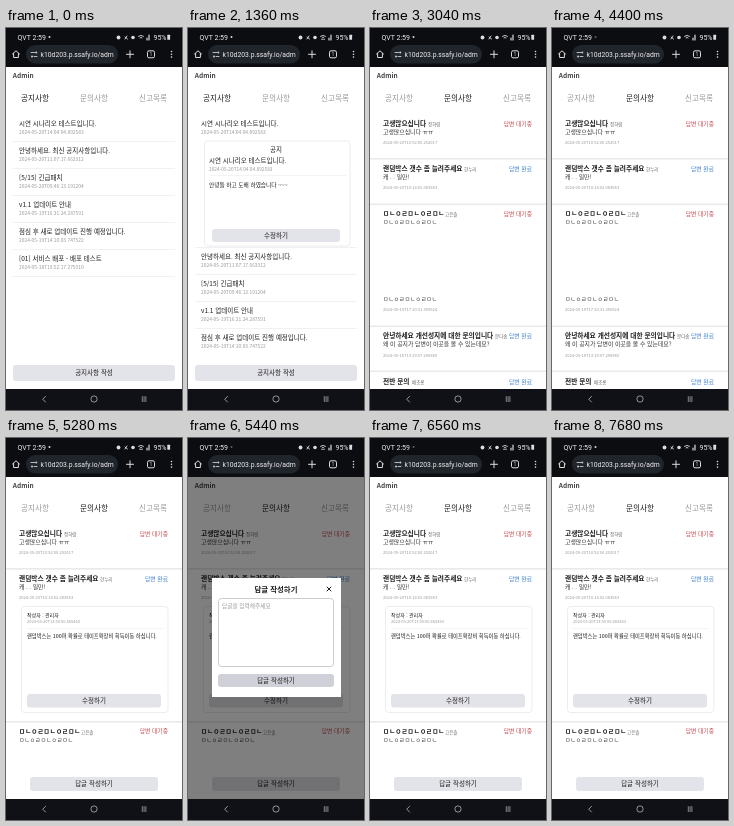
Write an HTML page that moves like this. It is 176 px wide and 382 px high and loops after 8 s.

```html
<!DOCTYPE html>
<html lang="ko">
<head>
<meta charset="utf-8">
<style>
html, body { margin: 0; width: 100%; height: 100%; overflow: hidden; background: #000; }
svg { display: block; width: 100vw; height: 100vh; }
text { font-family: "Noto Sans CJK KR", "Noto Sans CJK JP", sans-serif; white-space: pre; }
.system { font-family: Roboto, sans-serif; }
</style>
</head>
<body>
<svg id="stage" viewBox="0 0 176 382">
  <defs>
    <clipPath id="noticeClip"><rect y="80" width="176" height="241"/></clipPath>
    <clipPath id="inquiryClip"><rect y="80" width="176" height="277"/></clipPath>
  </defs>
</svg>
<script>
const stage = document.getElementById('stage');
const INK = '#1c1c1c', GRAY = '#999', LINE = '#eeeef0', BUTTON = '#e3e3ea';
const RED = '#c8464c', BLUE = '#3b7fd0', CHROME = '#0b0d11', ICON = '#ddd';

function add(parent, tag, attrs, content) {
  const node = document.createElementNS('http://www.w3.org/2000/svg', tag);
  for (const key in attrs) node.setAttribute(key, attrs[key]);
  if (content) node.textContent = content;
  return parent.appendChild(node);
}
const group = (parent, attrs = {}) => add(parent, 'g', attrs);
const box = (parent, x, y, width, height, fill, extra) =>
  add(parent, 'rect', { x, y, width, height, fill, ...extra });
const path = (parent, d, stroke, width = 1) =>
  add(parent, 'path', { d, stroke, 'stroke-width': width, fill: 'none', 'stroke-linecap': 'round' });
const dot = (parent, cx, cy, r, fill) => add(parent, 'circle', { cx, cy, r, fill });

// y is the vertical middle of the line
function label(parent, x, y, content, size = 6.5, fill = INK, extra = {}) {
  return add(parent, 'text', { x, y: y + size * .37, 'font-size': size, fill, ...extra }, content);
}
const MIDDLE = { 'text-anchor': 'middle' }, END = { 'text-anchor': 'end' };
const BOLD = { 'font-weight': 700 }, SYSTEM = { class: 'system' };

function button(parent, x, y, width, height, content, fill = BUTTON) {
  box(parent, x, y, width, height, fill, { rx: 3 });
  label(parent, 88, y + height / 2, content, 6.5, INK, MIDDLE);
}
const outline = (parent, x, y, width, height, stroke = '#e6e6ea') =>
  box(parent, x, y, width, height, '#fff', { rx: 3, stroke, 'stroke-width': .7 });
const show = (node, visible) => node.setAttribute('visibility', visible ? 'inherit' : 'hidden');
const shift = (node, y) => node.setAttribute('transform', `translate(0 ${y})`);

// Status bar and browser toolbar
box(stage, 0, 0, 176, 39, CHROME);
label(stage, 11.5, 9.3, 'QVT 2:59', 7, '#eee', SYSTEM);
const recording = dot(stage, 43.5, 9, 1, ICON);
dot(stage, 112.5, 9.5, 1.9, ICON);
path(stage, 'M119 11l2-3M121.5 11l-2.5-2', ICON, .9);
dot(stage, 127, 9.5, 1.8, ICON);
path(stage, 'M132.5 8.3q2.5-2 5 0M134 9.8q1-.8 2 0', ICON, .9);
const arrows = path(stage, 'M134 11.4h.1M136 11.4h.1', ICON, 1.2);
path(stage, 'M141 12v-2M143 12V7', ICON, 1.2);
label(stage, 160.5, 9.3, '95%', 7, '#eee', { ...SYSTEM, ...END });
box(stage, 161.3, 6.8, 2.8, 5, ICON, { rx: .5 });

path(stage, 'M6.5 26 10 22.8 13.5 26M7.6 25.5v4h4.8v-4', ICON);
box(stage, 20, 17, 92, 18.5, '#20242b', { rx: 9.2 });
path(stage, 'M25 24.5h4M28 28.5h3', '#ccc', .9);
dot(stage, 30.3, 24.5, 1, '#ccc');
dot(stage, 26, 28.5, 1, '#ccc');
label(stage, 34.5, 26.3, 'k10d203.p.ssafy.io/adm', 6.8, '#eee', SYSTEM);
path(stage, 'M120.5 26.3h7M124 22.8v7', ICON);
box(stage, 141.5, 22.8, 7, 7, 'none', { rx: 1.5, stroke: ICON });
label(stage, 145, 26.3, '1', 5, ICON, { ...SYSTEM, ...MIDDLE });
for (const y of [23.5, 26.3, 29.1]) dot(stage, 165.5, y, .8, ICON);

// Page
box(stage, 0, 39, 176, 322, '#fff');
label(stage, 6.8, 47.5, 'Admin', 6.5, '#444', BOLD);
const tabs = ['공지사항', '문의사항', '신고목록'].map((name, i) =>
  label(stage, 29 + 59 * i, 70.5, name, 7.6, GRAY, MIDDLE));

// Notices
const notices = group(stage);
const noticeList = group(notices, { 'clip-path': 'url(#noticeClip)' });
const noticeRest = group(noticeList);
const noticeRows = [
  ['시연 시나리오 테스트입니다.', '2024-05-20T14:04:04.892583'],
  ['안녕하세요. 최신 공지사항입니다.', '2024-05-20T11:07:17.663312'],
  ['[5/15] 긴급패치', '2024-05-20T09:46:13.191204'],
  ['v1.1 업데이트 안내', '2024-05-19T16:31:24.287591'],
  ['점심 후 새로 업데이트 진행 예정입니다.', '2024-05-19T14:10:03.747522'],
  ['[01] 서비스 배포 - 배포 테스트', '2024-05-18T19:52:17.275910'],
];
noticeRows.forEach(([title, date], i) => {
  const y = 96 + 27 * i;
  const row = i ? noticeRest : noticeList;
  label(row, 13, y, title);
  label(row, 13, y + 7.7, date, 4.9, GRAY);
  box(noticeRest, 7, y + 17, 162, .8, LINE);
});
const noticeDetail = group(noticeList);
outline(noticeDetail, 16.5, 113, 145.5, 105);
label(noticeDetail, 88, 122, '공지', 6.5, INK, MIDDLE);
label(noticeDetail, 21, 133, noticeRows[0][0]);
label(noticeDetail, 21, 141, noticeRows[0][1], 4.8, GRAY);
box(noticeDetail, 21, 147, 137, .7, LINE);
label(noticeDetail, 21, 156.5, '안녕들 하고 도배 하였습니다 ~~~', 5.7);
button(noticeDetail, 24, 201, 128, 13, '수정하기');
button(notices, 7, 337, 162, 16, '공지사항 작성');

// Inquiries
const inquiries = group(stage);
const inquiryList = group(inquiries, { 'clip-path': 'url(#inquiryClip)' });
const inquiryRest = group(inquiryList);
function inquiry(parent, y, title, author, authorX, body, answered, date, dateY) {
  label(parent, 13, y, title, 6.7, INK, BOLD);
  label(parent, authorX, y + .8, author, 4.5, '#666');
  label(parent, 162, y, answered ? '답변 완료' : '답변 대기중', 5.8, answered ? BLUE : RED, END);
  label(parent, 13, y + 8.3, body, 5.9, '#333');
  label(parent, 13, dateY, date, 4.1, GRAY);
}
const separator = (parent, y) => box(parent, 0, y, 176, 1.6, '#e9e9ec');
inquiry(inquiryList, 95.5, '고생많으십니다', '정하람', 58, '고생많으십니다 ㅠㅠ', false, '2024-05-20T10:52:00.252017', 114);
separator(inquiryList, 130);
inquiry(inquiryList, 140.5, '랜덤박스 갯수 좀 늘려주세요', '한누리', 94, '캐 . . 일만!', true, '2024-05-20T10:14:02.083583', 159);
separator(inquiryRest, 175.5);
inquiry(inquiryRest, 185.8, 'ㅁㄴㅇㄹㅁㄴㅇㄹㅁㄴ', '고은솔', 75, 'ㅁㄴㅇㄹㅁㄴㅇㄹㅁㄴ', false, '2024-05-19T17:20:31.350924', 281.5);
label(inquiryRest, 13, 271, 'ㅁㄴㅇㄹㅁㄴㅇㄹㅁㄴ', 5.9, '#333');
separator(inquiryRest, 297.5);
inquiry(inquiryRest, 308, '안녕하세요 개선성지에 대한 문의입니다', '문다솜', 125, '왜 이 공지가 답변이 이곳을 볼 수 있는데요?', true, '2024-05-18T13:19:57.290980', 327);
separator(inquiryRest, 342.5);
inquiry(inquiryRest, 353.5, '전반 문의', '배초롱', 42, '문의 드립니다', true, '2024-05-18T11:02:41.640251', 372);

const answer = group(inquiries);
outline(answer, 15.5, 168.5, 146.5, 106);
label(answer, 21, 177, '작성자 : 관리자', 5);
label(answer, 21, 184, '2024-05-20T13:50:00.465463', 4, GRAY);
box(answer, 21, 190, 136, .7, LINE);
label(answer, 21, 198.5, '랜덤박스는 100퍼 확률로 테이프확장비 획득이동 하십니다.', 5.3);
button(answer, 21, 256, 134, 13.5, '수정하기');
button(answer, 24, 339, 128, 14, '답글 작성하기');

// Reply dialog
const dialog = group(stage);
box(dialog, 0, 39, 176, 322, '#000', { opacity: .5 });
box(dialog, 24, 140, 129, 119, '#fff');
label(dialog, 88, 151, '답글 작성하기', 7.4, INK, { ...MIDDLE, ...BOLD });
path(dialog, 'M139 149l4 4m0-4l-4 4', INK);
outline(dialog, 30.5, 160.5, 115, 68, '#b8b8be');
label(dialog, 34, 168, '답글을 입력해주세요', 5.7, GRAY);
button(dialog, 30, 236, 116, 13, '답글 작성하기', '#cfd0d8');

// System navigation
box(stage, 0, 361, 176, 21, '#0f1116');
path(stage, 'M39.5 368.4l-2.8 2.8 2.8 2.8', '#bbb', .8);
box(stage, 85, 368, 6, 6, 'none', { rx: 2.6, stroke: '#bbb', 'stroke-width': .8 });
path(stage, 'M136.3 368.6v5M138.1 368.6v5M139.9 368.6v5', '#bbb', .7);

function draw() {
  const t = performance.now() % 8000;
  const between = (from, to) => t >= from && t < to;
  const onInquiries = t >= 3040;
  const noticeOpen = between(80, 2400);
  const answerOpen = t >= 4560;

  show(notices, !onInquiries);
  show(inquiries, onInquiries);
  show(noticeDetail, noticeOpen);
  shift(noticeRest, noticeOpen ? 106 : 0);
  show(answer, answerOpen);
  shift(inquiryRest, answerOpen ? 107.5 : 0);
  show(dialog, between(5440, 6560));
  tabs.forEach((tab, i) => tab.setAttribute('fill', i === +onInquiries ? INK : GRAY));

  recording.setAttribute('opacity', (t + 560) % 980 < 320 ? .4 : 1);
  show(arrows, between(1360, 2240) || between(3280, 4240) || between(5280, 7280));
  requestAnimationFrame(draw);
}
draw();
</script>
</body>
</html>
```
